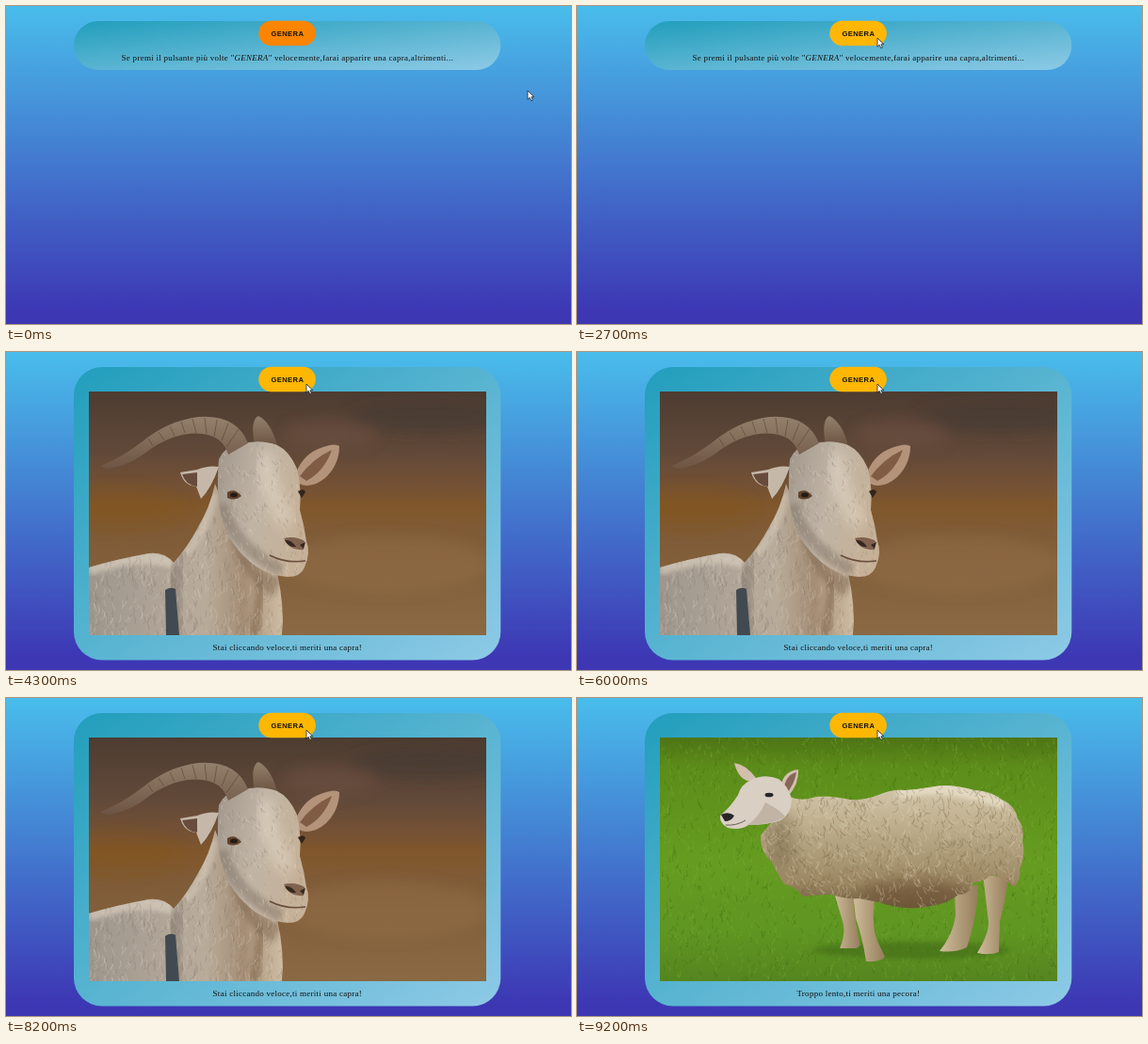
Recreate the animation shown at these times as an HTML page. Size 600 by 338 pixels, loop 9.3 s.

```html
<!DOCTYPE html>
<html lang="it">
<head>
<meta charset="utf-8">
<title>Genera</title>
<style>
  html, body { margin: 0; width: 100%; height: 100%; overflow: hidden; }
  svg { display: block; width: 600px; height: 338px; }
  text { text-anchor: middle; fill: #111; }
  .copy { font: 9px "Liberation Serif", "Times New Roman", serif; letter-spacing: .26px; }
  .label { font: bold 7.6px "Liberation Sans", Arial, sans-serif; letter-spacing: .4px; }
  .fur { fill: none; stroke-linecap: round; }
</style>
</head>
<body>
<svg viewBox="0 0 600 338">
  <defs>
    <linearGradient id="sky" x2="0" y2="1">
      <stop stop-color="#49bdeb"/><stop offset=".96" stop-color="#3d37b4"/>
    </linearGradient>
    <linearGradient id="glass" x2="1" y2="1">
      <stop stop-color="#219ebc"/><stop offset="1" stop-color="#8ecae6"/>
    </linearGradient>
    <linearGradient id="grass" x2="0" y2="1">
      <stop stop-color="#4e7415"/><stop offset=".12" stop-color="#5c8c1a"/>
      <stop offset=".5" stop-color="#659c20"/><stop offset=".8" stop-color="#5f9522"/>
      <stop offset="1" stop-color="#55851f"/>
    </linearGradient>
    <linearGradient id="wool" x2="0" y2="1">
      <stop stop-color="#d3c7ab"/><stop offset=".45" stop-color="#b5a481"/>
      <stop offset=".8" stop-color="#9b8762"/><stop offset="1" stop-color="#6f5a3b"/>
    </linearGradient>
    <linearGradient id="leg" x2="1" y2="0">
      <stop stop-color="#d0bd9c"/><stop offset="1" stop-color="#947d5b"/>
    </linearGradient>
    <linearGradient id="field" x2="0" y2="1">
      <stop stop-color="#4d3c31"/><stop offset=".25" stop-color="#614939"/>
      <stop offset=".4" stop-color="#765234"/><stop offset=".47" stop-color="#80572a"/>
      <stop offset=".58" stop-color="#7f5b37"/><stop offset="1" stop-color="#8a6944"/>
    </linearGradient>
    <linearGradient id="coat" x2="1" y2="0">
      <stop stop-color="#9e968d"/><stop offset=".4" stop-color="#b0a597"/>
      <stop offset=".6" stop-color="#b9ab9a"/><stop offset=".8" stop-color="#a48d74"/>
      <stop offset="1" stop-color="#cfbda3"/>
    </linearGradient>
    <linearGradient id="face" x2="1" y2=".3">
      <stop stop-color="#a0968b"/><stop offset=".5" stop-color="#c0b4a5"/>
      <stop offset="1" stop-color="#c6b198"/>
    </linearGradient>
    <linearGradient id="horn" x2="0" y2="1">
      <stop stop-color="#94806d"/><stop offset="1" stop-color="#6d5443"/>
    </linearGradient>
    <filter id="soft" x="-30%" y="-60%" width="160%" height="220%"><feGaussianBlur stdDeviation="7"/></filter>
    <filter id="hazy" x="-30%" y="-60%" width="160%" height="220%"><feGaussianBlur stdDeviation="2.5"/></filter>
    <clipPath id="frame"><rect x="88" y="42" width="422" height="259"/></clipPath>
    <path id="fleece" d="M226 105Q238 110 250 106T290 108Q306 109 320 103T348 98Q364 97 380 94T422 98Q440 99 451 108Q465 114 468 128Q476 139 473 152Q477 168 470 182Q472 193 464 201Q455 192 440 188Q430 196 421 196Q417 209 405 209Q392 220 370 222Q347 226 320 217L300 213Q285 214 270 209Q254 209 240 211Q232 200 220 198Q211 184 207 174Q195 165 195 146L205 134Q219 124 226 105Z"/>
    <path id="chest" d="M222 140Q217 165 203 188Q193 207 178 224Q168 212 152 214Q118 220 88 229V301H293Q296 270 288 236L240 185Z"/>
    <path id="muzzle" d="M226 114Q234 98 250 98Q268 92 288 99Q301 105 309 124Q314 145 312 168Q317 185 319 201Q324 213 317 229Q313 239 299 239Q274 237 257 221Q239 205 232 186Q222 160 226 114Z"/>
    <clipPath id="inFleece"><use href="#fleece"/></clipPath>
    <clipPath id="inChest"><use href="#chest"/></clipPath>
    <clipPath id="inMuzzle"><use href="#muzzle"/></clipPath>
  </defs>

  <rect width="600" height="338" fill="url(#sky)"/>
  <rect id="panel" x="72" y="16" width="453.3" height="52" rx="26" fill="url(#glass)"/>

  <g id="sheep" clip-path="url(#frame)">
    <rect x="88" y="42" width="422" height="259" fill="url(#grass)"/>
    <g id="blades" class="fur"></g>
    <ellipse cx="355" cy="268" rx="105" ry="9" fill="#3f6815" opacity=".55" filter="url(#hazy)"/>
    <g fill="url(#leg)">
      <path d="M272 204L293 208Q295 240 301 263L297 266H279Q286 250 282 237Z"/>
      <path d="M293 208H317Q312 236 318 256L327 275Q324 281 307 280Q303 254 296 234Z"/>
      <path d="M401 205L426 198Q426 229 414 265Q402 271 385 269Q399 252 402 231Z"/>
      <path d="M431 187L458 192Q454 220 449 237L448 270Q438 274 425 271Q437 252 437 238Z"/>
    </g>
    <use href="#fleece" fill="url(#wool)"/>
    <g clip-path="url(#inFleece)">
      <ellipse cx="360" cy="207" rx="58" ry="15" fill="#68492f" opacity=".5" filter="url(#soft)"/>
      <ellipse cx="216" cy="151" rx="15" ry="32" fill="#665538" opacity=".35" filter="url(#soft)"/>
      <path d="M340 102Q390 88 455 113" fill="none" stroke="#eee5d1" stroke-width="12" opacity=".65" filter="url(#hazy)"/>
      <g id="curls" class="fur"></g>
    </g>
    <path d="M187 89Q172 89 167 69Q180 71 190 85ZM216 100Q216 78 235 76Q236 91 224 105Z" fill="#d3bfae"/>
    <path d="M219 98Q222 81 233 79Q231 92 222 102Z" fill="#86675a"/>
    <path d="M185 87Q199 80 214 86Q224 93 228 107Q228 123 216 130Q204 135 182 135Q174 141 160 138Q151 133 152 125Q163 116 171 103Q174 92 185 87Z" fill="#d9cfc2"/>
    <path d="M200 111Q216 119 221 126Q208 135 181 135Q193 127 200 111Z" fill="#b9aa99" opacity=".7"/>
    <path d="M153 124Q161 120 167 125Q164 131 157 131Z" fill="#28252a"/>
    <path d="M158 135Q169 136 179 130" fill="none" stroke="#6d615d"/>
    <ellipse cx="204" cy="103" rx="4.5" ry="2.3" fill="#25262c"/>
  </g>

  <g id="goat" clip-path="url(#frame)">
    <rect x="88" y="42" width="422" height="259" fill="url(#field)"/>
    <g filter="url(#soft)">
      <ellipse cx="450" cy="70" rx="90" ry="17" fill="#433630" opacity=".5"/>
      <ellipse cx="345" cy="88" rx="50" ry="16" fill="#6d5140" opacity=".6"/>
      <ellipse cx="120" cy="166" rx="65" ry="22" fill="#835618" opacity=".4"/>
      <ellipse cx="405" cy="225" rx="110" ry="30" fill="#96734b" opacity=".4"/>
    </g>
    <path d="M264 99Q259 72 268 68Q281 74 288 99Z" fill="url(#horn)"/>
    <use href="#chest" fill="url(#coat)"/>
    <g clip-path="url(#inChest)">
      <path d="M232 180Q245 220 292 242L285 260Q247 242 232 180Z" fill="#7f6650" opacity=".5" filter="url(#hazy)"/>
      <path d="M270 238Q272 265 262 301" stroke="#80674e" stroke-width="9" fill="none" opacity=".6" filter="url(#hazy)"/>
      <path d="M184 218Q171 252 185 301" stroke="#746b62" stroke-width="18" fill="none" opacity=".45" filter="url(#soft)"/>
      <path d="M88 231Q145 212 178 224" stroke="#e0d5c4" stroke-width="13" fill="none" opacity=".6" filter="url(#hazy)"/>
      <path d="M221 150Q214 185 192 214" stroke="#d8ccbb" stroke-width="9" fill="none" opacity=".5" filter="url(#hazy)"/>
      <g id="coatHair" class="fur"></g>
    </g>
    <path d="M169 253Q175 249 180 252L184 301H170Z" fill="#414a50"/>
    <path d="M309 126Q317 108 334 102Q349 96 354 100Q354 119 340 133Q325 146 311 140Z" fill="#b3937a"/>
    <path d="M312 132Q325 114 346 104Q338 127 319 137Z" fill="#805c45"/>
    <use href="#muzzle" fill="url(#face)"/>
    <g clip-path="url(#inMuzzle)">
      <path d="M229 162Q240 205 292 232" stroke="#75675a" stroke-width="13" fill="none" opacity=".4" filter="url(#hazy)"/>
      <path d="M274 108Q276 145 300 183" stroke="#eee3d2" stroke-width="19" fill="none" opacity=".45" filter="url(#soft)"/>
      <g id="faceHair" class="fur"></g>
    </g>
    <path d="M101 121Q126 110 145 95Q172 73 204 69Q245 66 257 97L236 109Q230 89 208 87Q184 84 155 102Q129 123 106 124Z" fill="url(#horn)"/>
    <path d="M151 92L156 100M162 85L168 94M174 79L179 89M186 74L190 86M198 71L202 86M211 70L213 87M224 72L221 90M236 76L229 94M247 82L234 101" stroke="#4f3b2e" fill="none" opacity=".5"/>
    <path d="M226 122Q215 120 203 125L185 128Q189 142 202 143L207 156Q218 145 226 122Z" fill="#c5b8a8"/>
    <path d="M187 130L203 128V143Q191 142 187 130Z" fill="#674b3c"/>
    <path d="M235 149Q243 144 250 153Q243 159 235 155Z" fill="#62432c"/>
    <ellipse cx="242" cy="152" rx="4" ry="2.5" fill="#251c17"/>
    <path d="M310 148Q317 144 318 149L314 155Z" fill="#34251b"/>
    <path d="M295 198Q307 195 317 201L316 210Q301 212 295 198Z" fill="#80624f"/>
    <path d="M296 200Q303 199 308 207Q300 208 296 200ZM312 205L318 202L316 209Z" fill="#36271f"/>
    <path d="M280 216Q297 225 318 222" fill="none" stroke="#694d3b" stroke-width="1.6"/>
  </g>

  <text id="copy" class="copy" x="298.8"></text>
  <rect id="button" x="268.3" y="15.8" width="60.6" height="26.4" rx="13.2"/>
  <text class="label" x="298.9" y="31.8">GENERA</text>
  <path id="cursor" d="M0 0V9.3L2.2 7.3L3.8 10.8L5.4 10.1L3.9 6.7H6.8Z" fill="#fff" stroke="#222" stroke-width=".8" stroke-linejoin="round"/>
</svg>
<script>
const LOOP = 9300, STEP = 100;
const $ = id => document.getElementById(id);

const HINT = 'Se premi il pulsante più volte "<tspan font-style="italic">GENERA</tspan>" velocemente,farai apparire una capra,altrimenti...';
const SLOW = 'Troppo lento,ti meriti una pecora!';
const FAST = 'Stai cliccando veloce,ti meriti una capra!';
const scenes = [
  { at: 0, text: HINT },
  { at: 2800, photo: 'sheep', text: SLOW },
  { at: 3900, photo: 'goat', text: FAST },
  { at: 8400, photo: 'sheep', text: SLOW }
];
const route = [[600, 554, 90], [900, 532, 94], [1200, 452, 76], [1500, 344, 42], [1700, 319, 34]];
const hover = { from: 1500, to: 2000, cold: [251, 133, 0], hot: [255, 183, 3] };

function seeded(seed) {
  return () => (seed = (seed * 16807) % 2147483647) / 2147483647;
}

// Scatter short strokes over a box in each of the given tones.
function tufts(id, tones, count, [x, y, w, h], len, angle, spread) {
  const rnd = seeded(id.length * 977);
  for (const tone of tones) {
    let d = '';
    for (let i = 0; i < count; i++) {
      const a = angle + (rnd() - .5) * spread, l = len * (.5 + rnd());
      d += `M${(x + rnd() * w).toFixed(1)} ${(y + rnd() * h).toFixed(1)}` +
           `q${(l * .2).toFixed(1)} ${(l * .6).toFixed(1)} ${(Math.cos(a) * l).toFixed(1)} ${(Math.sin(a) * l).toFixed(1)}`;
    }
    const path = document.createElementNS('http://www.w3.org/2000/svg', 'path');
    path.setAttribute('d', d);
    path.setAttribute('stroke', tone);
    path.setAttribute('opacity', .3);
    $(id).append(path);
  }
}

tufts('blades', ['#3c6510', '#83b637'], 1000, [88, 42, 422, 259], 4, -1.5, 1.6);
tufts('curls', ['#6b5737', '#e4d8bc'], 700, [190, 92, 290, 135], 6, 1.4, 2);
tufts('coatHair', ['#7d7166', '#ddd2c3'], 330, [88, 170, 210, 132], 7, 1.7, 1);
tufts('faceHair', ['#86796c', '#e6dccd'], 130, [222, 95, 100, 145], 4, 1.3, 1.2);

const mix = (a, b, p) => a + (b - a) * p;

function cursorAt(t) {
  const next = route.findIndex(p => p[0] > t);
  if (next === 0) return route[0].slice(1);
  if (next < 0) return route[route.length - 1].slice(1);
  const a = route[next - 1], b = route[next], p = (t - a[0]) / (b[0] - a[0]);
  return [mix(a[1], b[1], p), mix(a[2], b[2], p)];
}

let shown;
function show(scene) {
  if (scene === shown) return;
  shown = scene;
  const open = !!scene.photo;
  $('panel').setAttribute('height', open ? 311.5 : 52);
  $('panel').setAttribute('rx', open ? 30 : 26);
  for (const id of ['sheep', 'goat']) $(id).style.display = id === scene.photo ? '' : 'none';
  $('copy').setAttribute('y', open ? 317.4 : 58);
  $('copy').innerHTML = scene.text;
}

function render(t) {
  show(scenes.filter(s => s.at <= t).pop());
  $('cursor').setAttribute('transform', `translate(${cursorAt(t)})`);
  const p = Math.min(1, Math.max(0, (t - hover.from) / (hover.to - hover.from)));
  $('button').setAttribute('fill', `rgb(${hover.cold.map((c, i) => Math.round(mix(c, hover.hot[i], p)))})`);
}

const start = performance.now();
function tick() {
  const t = (performance.now() - start) % LOOP;
  render(Math.floor(t / STEP) * STEP);
  requestAnimationFrame(tick);
}
tick();
</script>
</body>
</html>
```
